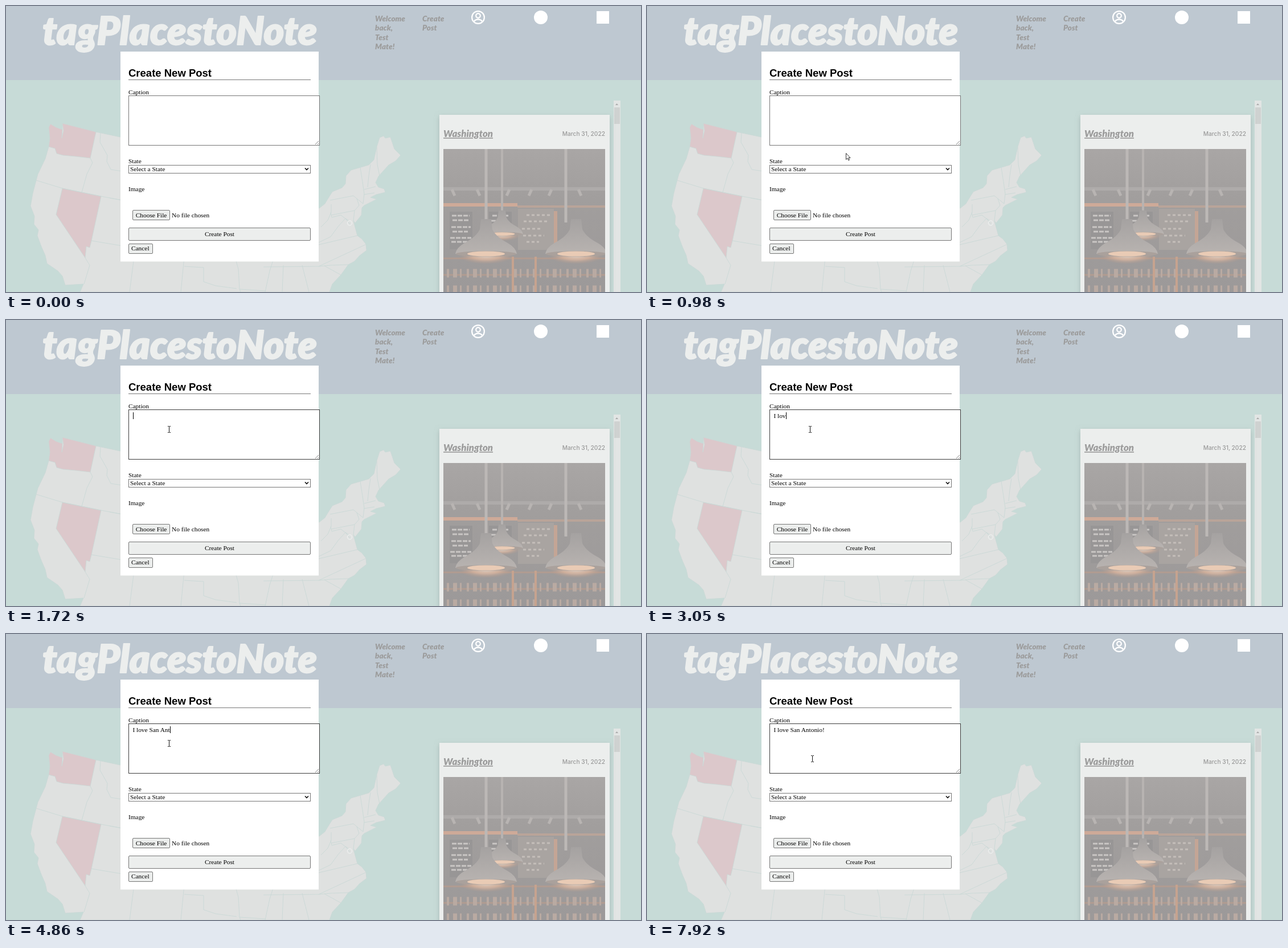
Recreate the animation shown at these times as an HTML page. Size 1115 by 502 pixels, loop 7.99 s.

```html
<!DOCTYPE html>
<html lang="en">
<head>
<meta charset="utf-8">
<title>Create New Post</title>
<style>
  html, body { margin: 0; width: 100%; height: 100%; overflow: hidden; background: #c7dbd7; }
  svg { display: block; }
  text { white-space: pre; }
  .script { font-family: Lato, cursive; font-style: italic; font-weight: 900; fill: #9c9c9c; }
  .form text { font: 11.37px "Liberation Serif", "Times New Roman", serif; fill: #000; }
  .form .heading { font: bold 18.5px "Liberation Sans", Arial, sans-serif; }
  .box { fill: #fff; stroke: #767676; }
  .button { fill: #eceeed; stroke: #767676; }
  .land { fill: #dfe1e0; stroke: #cad9d6; stroke-width: .8; stroke-linejoin: round; }
  .visited { fill: #dcc8cb; }
  .borders { fill: none; stroke: #cad9d6; stroke-width: .9; }
</style>
</head>
<body>
<svg width="1115" height="502" viewBox="0 0 1115 502">
  <defs>
    <linearGradient id="wall" x2="0" y2="1">
      <stop offset="0" stop-color="#a9a6a5"/><stop offset=".35" stop-color="#a19e9d"/>
      <stop offset="1" stop-color="#9c9999"/>
    </linearGradient>
    <linearGradient id="shade" x2="0" y2="1">
      <stop offset="0" stop-color="#a5a2a1"/><stop offset="1" stop-color="#b9b4b1"/>
    </linearGradient>
    <radialGradient id="glow">
      <stop offset="0" stop-color="#f0dccb"/><stop offset=".5" stop-color="#dcb7a0"/>
      <stop offset="1" stop-color="#b99a8a" stop-opacity="0"/>
    </radialGradient>
    <filter id="shadow" x="-10%" y="-10%" width="120%" height="120%">
      <feDropShadow dx="0" dy="3" stdDeviation="5" flood-color="#8a9a97" flood-opacity=".5"/>
    </filter>
    <clipPath id="frame"><path d="M768 251H1052V502H768Z"/></clipPath>
    <g id="lamp">
      <ellipse cy="19" rx="48" ry="14" fill="url(#glow)" opacity=".7"/>
      <path d="M-9-46H9L11-28Q17-15 38-4Q52 4 54 15Q0 22-54 15Q-52 4-38-4Q-17-15-11-28Z" fill="url(#shade)"/>
      <ellipse cy="15" rx="53" ry="5" fill="#aaa19c"/>
      <ellipse cy="15" rx="33" ry="4.5" fill="#e9cbb5"/>
    </g>
  </defs>

  <!-- header -->
  <path d="M0 0H1115V130H0Z" fill="#bec8d1"/>
  <text class="script" x="64" y="68" font-size="68" style="fill:#eceeed;stroke:#eceeed;stroke-width:2;stroke-linejoin:round">tagPlacestoNote</text>
  <g class="script" font-size="13.5" font-weight="700">
    <text x="648" y="27">Welcome</text><text x="648" y="43">back,</text>
    <text x="648" y="59.5">Test</text><text x="648" y="76">Mate!</text>
    <text x="731" y="27">Create</text><text x="731" y="43">Post</text>
  </g>
  <g fill="none" stroke="#fff" stroke-width="2.3">
    <circle cx="829" cy="20" r="10.9"/><circle cx="829" cy="17" r="3.8"/>
    <path d="M821.5 27.5Q824 23.5 829 23.5T836.5 27.5"/>
  </g>
  <circle cx="939" cy="20" r="12" fill="#fff"/>
  <rect x="1037" y="9" width="22" height="22" fill="#fff"/>

  <!-- map -->
  <path class="land" d="M78 207L88 213L99 217V206L158 221L210 232H540V352L550 355L560 347L566 337L573 326L590 319L596 312L597 298L606 288L637 279L646 270L651 247L656 231L663 228L666 232L675 230L682 251L686 255L693 262L684 272L672 279L663 289L654 299L649 310L654 318L664 321L666 327L650 331L640 336L651 339L629 350L625 354L624 367L613 381L610 377L614 392L617 403L625 409L632 418L633 429L621 438L612 448L601 454L588 472L573 488L568 502H130L136 488L104 490L99 474L91 465L72 452L69 438L62 422L55 403L57 393L49 383L50 369L43 351L47 329L53 306L56 295L69 268L75 247L77 232L75 213Z"/>
  <path class="land visited" d="M78 207L88 213L99 217L98 232L101 219L99 206L158 221L148 267L122 264L100 262L89 259L86 250L75 247L77 232L75 213Z"/>
  <path class="land visited" d="M99 320L167 334L150 412L147 424L141 422L139 442L88 366Z"/>
  <g class="borders">
    <path d="M53 306L99 320L167 334L210 342M148 267L152 275L142 295L133 327M166 223L165 239L178 262L177 273L184 287L210 291M150 412L210 422M139 442L147 455L137 488M182 337L210 342"/>
    <path d="M225 440L217 502M313 440L307 502M313 457L347 459V484L368 491L405 496M402 440L408 462L410 497L455 500M410 497L412 502M471 440L463 465L455 502M487 455L485 502M520 455L532 502M452 458L549 457L633 418M549 457L570 455L601 454M559 456L588 472"/>
    <path d="M549 415L570 405L584 386L596 373L604 378M549 419L617 403M553 388L565 376L571 362V348M571 367L612 359L620 350L616 338L610 333L569 341M616 338L627 347M627 347L629 330L626 309L622 283M629 322L649 317M628 331L647 328M635 318L637 298L640 278M651 247L652 278L656 298M612 359L610 377M570 362L572 371L588 367L597 374L604 383"/>
  </g>
  <circle cx="603.5" cy="381" r="4" fill="none" stroke="#eceeed" stroke-width="1.5"/>

  <!-- feed -->
  <path d="M1067 166H1079V502H1067Z" fill="#e2e5e4"/>
  <path d="M1068 178H1078V207H1068Z" fill="#cfd2d1"/>
  <path d="M1070 174L1072.500 171L1075 174Z" fill="#aaa"/>
  <path d="M761 191H1060V520H761Z" fill="#eceeed" filter="url(#shadow)"/>
  <text class="script" x="768" y="230" font-size="16.8" text-decoration="underline">Washington</text>
  <text x="1052" y="228" text-anchor="end" font-family="Inter, sans-serif" font-size="10.2" font-weight="500" fill="#999">March 31, 2022</text>
  <g clip-path="url(#frame)">
    <path d="M768 251H1052V502H768Z" fill="url(#wall)"/>
    <path d="M768 318H1052V324H768Z" fill="#aeabaa"/>
    <path d="M768 346H898V352H768Z" fill="#ceaa98"/>
    <path d="M898 350H1052V354H898Z" fill="#b9a499"/>
    <path d="M779 361H819V427H779ZM848 361H888V402H848Z" fill="#989696"/>
    <path d="M783 368H814M784 376H812M782 388H816M784 396H811M780 407H817M782 414H814M854 368H882M852 377H880" stroke="#c9c6c4" stroke-width="3" stroke-dasharray="8 2"/>
    <path d="M899 356H962V428H899Z" fill="#a9a4a1"/>
    <path d="M914 367H959M909 378H951M906 391H940M908 403H945M914 414H936" stroke="#c4beb9" stroke-width="3" stroke-dasharray="5 4"/>
    <path d="M962 360H968V430H962Z" fill="#c4a595"/>
    <path d="M768 443H1052M768 472H1052" stroke="#b19c91" stroke-width="3"/>
    <path d="M774 469H1052M774 498H1052" stroke="#b9aaa2" stroke-width="15" stroke-dasharray="4 7 7 5 3 9"/>
    <path d="M890 440V502M930 440V502" stroke="#c6a38f" stroke-width="4"/>
    <path d="M783 322L788 333M827 322L832 333M884 322L879 333M923 322L918 333M958 322L953 333M1005 322L1010 333" stroke="#b8b4b2" stroke-width="5"/>
    <path d="M843 251V380M983 251V380" stroke="#bcb8b6" stroke-width="5"/>
    <path d="M871 251V360" stroke="#b7b3b1" stroke-width="4"/>
    <use href="#lamp" transform="translate(871 390) scale(.68)"/>
    <use href="#lamp" x="843" y="420"/>
    <use href="#lamp" x="1001" y="420"/>
  </g>

  <!-- form -->
  <g class="form">
    <path d="M201 80H549V448.500H201Z" fill="#fff"/>
    <text class="heading" x="215" y="124">Create New Post</text>
    <path d="M215 129.500H535" stroke="#777"/>
    <text x="215" y="154.500">Caption</text>
    <rect id="area" class="box" x="215.500" y="157.500" width="335" height="87"/>
    <path d="M543 243L549 237M547 243L549 241" stroke="#777" stroke-width=".9"/>
    <text id="typed" x="222.400" y="171.500"></text>
    <rect id="caret" y="162" width="1" height="12"/>
    <text x="215" y="276">State</text>
    <rect class="box" x="215.500" y="279.500" width="319" height="14"/>
    <text x="218" y="290">Select a State</text>
    <path d="M525 284.500L528 287.500L531 284.500" fill="none" stroke="#111" stroke-width="1.600"/>
    <text x="215" y="325">Image</text>
    <rect class="button" x="222.500" y="358.500" width="65" height="17" rx="1.500"/>
    <text x="227.800" y="371">Choose File</text>
    <text x="291" y="371">No file chosen</text>
    <rect class="button" x="215.500" y="389.500" width="319" height="22" rx="1.500"/>
    <text x="375" y="404" text-anchor="middle">Create Post</text>
    <rect class="button" x="215.500" y="417.500" width="42" height="17" rx="1.500"/>
    <text x="220" y="429">Cancel</text>
  </g>
  <path id="arrow" d="M.5.5V11.500L3 9.200L4.800 13L6.500 12.200L4.800 8.500H8Z" fill="#fff" stroke="#222" stroke-width=".9"/>
  <path id="beam" d="M-2-5.500H-.5L.5-5L1.500-5.500H3M.5-5V5M-2 5.500H-.5L.5 5L1.500 5.500H3" fill="none" stroke="#111"/>
</svg>
<script>
const LOOP = 7990, PRESS = 1590, RELEASE = 1720, BLINK = 525;
const CAPTION = 'I love San Antonio!';
const KEYS = [2640, 2720, 2850, 2920, 3050, 3190, 3320, 3650, 3780, 3910,
  4050, 4270, 4660, 4860, 5790, 5990, 6400, 6600, 7060];
const [area, typed, caret, arrow, beam] =
  ['area', 'typed', 'caret', 'arrow', 'beam'].map(id => document.getElementById(id));

// Progress in n equal jumps, the first at start and the last at end.
const jumps = (t, start, end, n) =>
  Math.max(0, Math.min(n, Math.floor((t - start) / (end - start) * (n - 1) + 1e-6) + 1)) / n;
const mix = (a, b, p) => a + (b - a) * p;
const show = (el, on) => el.setAttribute('visibility', on ? 'visible' : 'hidden');

function pointer(t) {
  if (t < 850) {
    const p = (jumps(t, 520, 650, 3) - 1 / 3) * 1.5;
    return [mix(791, 390, p), 347 - 210 * p + 164 * p * p];
  }
  if (t < 7790) {
    const p = jumps(t, 850, 1390, 9), e = p * (2 - p);
    return [mix(390, 286, e), mix(301, 192, e)];
  }
  const p = jumps(t, 7790, 7920, 3);
  return [mix(286, 290, p), mix(192, 219, p)];
}

function draw(t) {
  const [x, y] = pointer(t).map(Math.round);
  const inside = t > 850 && y < 245;
  const place = `translate(${x} ${y})`;
  arrow.setAttribute('transform', place);
  beam.setAttribute('transform', place);
  show(arrow, t >= 520 && !inside);
  show(beam, inside);
  const pressed = t >= PRESS && t < RELEASE;
  area.style.stroke = pressed ? '#8d8d8d' : inside ? '#3c3c3c' : '#767676';

  const count = KEYS.filter(k => k <= t).length;
  typed.textContent = CAPTION.slice(0, count);
  const last = count ? KEYS[count - 1] : PRESS;
  const width = count ? typed.getComputedTextLength() : 0;
  caret.setAttribute('x', Math.floor(222.4 + width + .6));
  show(caret, t >= last && t < last + BLINK);
}

const begin = performance.now();
function tick() {
  draw((performance.now() - begin) % LOOP);
  requestAnimationFrame(tick);
}
tick();
</script>
</body>
</html>
```
